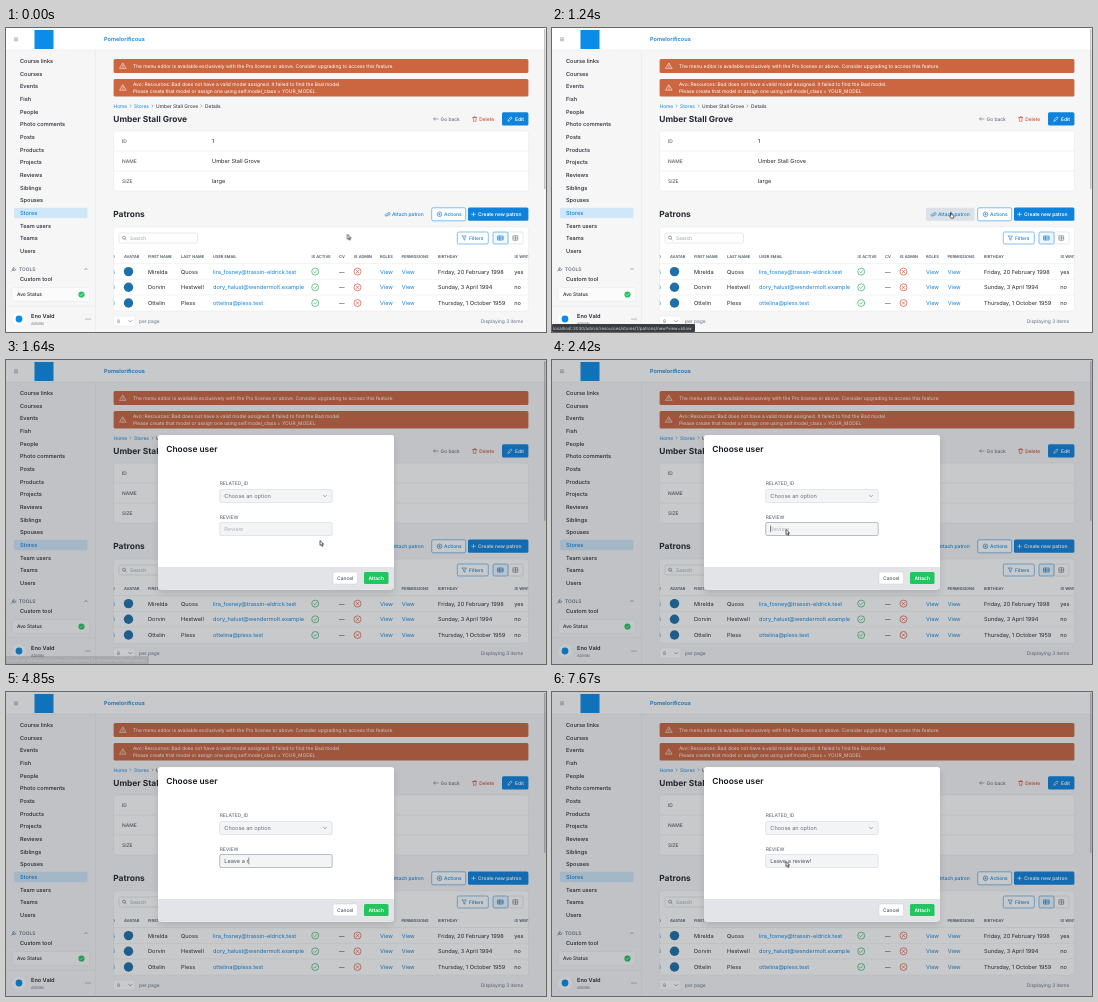
Recreate the animation shown at these times as an HTML page. Size 540 by 304 pixels, loop 8000 ms.

```html
<!DOCTYPE html>
<html lang="en">
<head>
<meta charset="utf-8">
<title>Attach patron</title>
<style>
  html, body { margin: 0; width: 100%; height: 100%; overflow: hidden; background: #f6f6f7; }
  svg { display: block; width: 100vw; height: 100vh; }
  text { font-family: Inter, sans-serif; text-rendering: geometricPrecision; white-space: pre; }

  .timed { animation: 8s step-end infinite; }
  #modal { animation-name: modal; }
  #hover { animation-name: hover; }
  #status { animation-name: status; animation-timing-function: linear; }
  #field { animation-name: focus; animation-timing-function: linear; }
  #cursor { animation-name: move; animation-timing-function: ease-in-out; }
  #pointer { animation-name: pointer; }
  #arrow { animation-name: arrow; }
  #hand { animation-name: hand; }

  @keyframes modal { 0% { visibility: hidden; } 15.7%, 100% { visibility: visible; } }
  @keyframes hover { 0%, 15.7%, 100% { opacity: 0; } 14% { opacity: 1; } }
  @keyframes status {
    0%, 13.9% { opacity: 0; }
    14.1%, 18.2% { opacity: 1; }
    21%, 100% { opacity: 0; }
  }
  @keyframes focus {
    0%, 25.7% { stroke: #cdd0d4; }
    26.1%, 93.5% { stroke: #777c84; }
    95.5%, 100% { stroke: #cdd0d4; }
  }
  @keyframes move {
    0%, .3% { transform: translate(341.4px, 206.3px); }
    1.5%, 4.7% { transform: translate(335.5px, 201.5px); }
    14.75%, 16.4% { transform: translate(398px, 184.5px); animation-timing-function: ease-in; }
    20.5% { transform: translate(314.4px, 180.5px); animation-timing-function: ease-out; }
    25%, 90% { transform: translate(234px, 169.5px); }
    91.6% { transform: translate(236px, 171px); }
    95.8%, 100% { transform: translate(234px, 169.5px); }
  }
  @keyframes pointer { 0%, 91.6%, 100% { opacity: 1; } 39% { opacity: 0; } }
  @keyframes arrow { 0%, 16.6%, 100% { opacity: 1; } 14% { opacity: 0; } }
  @keyframes hand { 0%, 16.6%, 100% { opacity: 0; } 14% { opacity: 1; } }
</style>
</head>
<body>
<svg id="stage" viewBox="0 0 540 304" preserveAspectRatio="none"></svg>
<script>
const BLUE = '#0f83dc', INK = '#24282f', GRAY = '#6b7280', LINE = '#e4e6e9';
const SMALL = 4.9, BASE = 5.6, TITLE = 8.4;
const STORE = 'Umber Stall Grove';

// Text is placed by its vertical middle.
const text = (x, mid, str, size = BASE, fill = INK, weight = 400, anchor = 'start') =>
  `<text x="${x}" y="${mid + size * .36}" font-size="${size}" fill="${fill}" font-weight="${weight}" text-anchor="${anchor}">${str}</text>`;
const rect = (x, y, w, h, fill, stroke = 'none', r = 1.5, extra = '') =>
  `<rect x="${x}" y="${y}" width="${w}" height="${h}" rx="${r}" fill="${fill}" stroke="${stroke}" stroke-width=".5" ${extra}/>`;
const disc = (x, y, r, fill, stroke = 'none') =>
  `<circle cx="${x}" cy="${y}" r="${r}" fill="${fill}" stroke="${stroke}" stroke-width=".65"/>`;
const icon = (x, y, d, color, width = .6) =>
  `<path transform="translate(${x} ${y})" d="${d}" fill="none" stroke="${color}" stroke-width="${width}" stroke-linecap="round" stroke-linejoin="round"/>`;
const hline = (x1, x2, y, color = LINE) => icon(x1, y, `M0 0H${x2 - x1}`, color, .5);

// Icon paths, drawn around their centre.
const CHECK = 'M-1.5 .1L-.4 1.2L1.6 -1.1';
const CROSS = 'M-1.3 -1.3L1.3 1.3M1.3 -1.3L-1.3 1.3';
const DOWN = 'M-1.6 -.8L0 .8L1.6 -.8';
const NEXT = 'M-.6 -1.2L.6 0L-.6 1.2';
const WARN = 'M0 -2.7L3.1 2.4H-3.1ZM0 -1V.6M0 1.5V1.6';
const GRID = 'M-2.2 -2.2H2.2V2.2H-2.2ZM0 -2.2V2.2M-2.2 0H2.2';
const CLIP = 'M-.6 1.2L1.3 -.7M-.7 -.2L.8 -1.7A1.2 1.2 0 0 1 2.4 0L.9 1.6M.4 .5L-.9 1.9A1.2 1.2 0 0 1 -2.3 .3L-1.3 -.7';
const WRENCH = 'M-2.2 2.2L.5 -.5M.2 -1.6A1.6 1.6 0 1 0 2.1 .2';

function sidebar() {
  const items = ['Course links', 'Courses', 'Events', 'Fish', 'People', 'Photo comments', 'Posts', 'Products',
    'Projects', 'Reviews', 'Siblings', 'Spouses', 'Stores', 'Team users', 'Teams', 'Users'];
  return rect(8, 179.8, 73.5, 10.4, '#cfe7f8') +
    items.map((name, i) => text(14, 33 + i * 12.66, name, BASE, name === 'Stores' ? BLUE : INK, 500)).join('') +
    icon(7.8, 241, WRENCH, GRAY, .8) +
    text(13, 241, 'TOOLS', SMALL, GRAY, 600) + icon(80, 241, 'M-1.3 .7L0 -.7L1.3 .7', GRAY) +
    text(14, 251, 'Custom tool', BASE, INK, 500) +
    rect(0, 254.5, 88, 49.5, '#f6f6f7', 'none', 0) +
    rect(6, 259.5, 77.5, 14, '#fbfbfb', LINE) + text(11, 266.5, 'Avo Status', SMALL, INK, 500) +
    disc(75.5, 266.5, 3.1, '#22c55e') + icon(75.5, 266.5, CHECK, '#fff', .5) +
    hline(0, 89, 278) + disc(13, 291, 6.6, '#fff') + disc(13, 291, 3.4, '#0b8ce9') +
    text(25, 288.4, 'Eno Vald', BASE, INK, 600) + text(25, 296, 'ADMIN', 3.8, GRAY) +
    [-2, 0, 2].map(dx => disc(82 + dx, 291, .55, GRAY)).join('') +
    rect(89, 22, .5, 282, LINE, 'none', 0);
}

function header() {
  return rect(0, 0, 540, 22, '#fff', 'none', 0) + hline(0, 540, 22) +
    icon(10, 11.3, 'M-1.7 -1.4H1.7M-1.7 0H1.7M-1.7 1.4H1.7', GRAY, .5) +
    rect(28.5, 2, 19, 19, '#0b8ce9', 'none', 0) + text(98, 11.3, 'Pomelorificous', BASE, BLUE, 600) +
    rect(538.2, 1, 1.2, 160, '#b4b6b9', 'none', .6);
}

function details() {
  const banner = (y, h) => rect(107.6, y, 414.8, h, '#cb6640') + icon(117, y + h / 2, WARN, '#fff', .55);
  const row = (label, value, y) => text(116, y, label, SMALL, '#565c66', 500) + text(206, y, value);
  return banner(31, 14) + banner(51, 17.5) +
    text(127, 38, 'The menu editor is available exclusively with the Pro license or above. Consider upgrading to access this feature.', SMALL, '#fff') +
    text(127, 56.7, 'Avo::Resources::Bad does not have a valid model assigned. It failed to find the Bad model.', SMALL, '#fff') +
    text(127, 63, 'Please create that model or assign one using self.model_class = YOUR_MODEL', SMALL, '#fff') +
    text(107.5, 78, 'Home', SMALL, BLUE) + text(128, 78, 'Stores', SMALL, BLUE) +
    text(150, 78, STORE, SMALL) + text(199, 78, 'Details', SMALL) +
    [124.7, 146.7, 195.6].map(x => icon(x, 78, NEXT, GRAY, .5)).join('') +
    text(107.3, 91, STORE, TITLE, INK, 700) +
    icon(429.8, 91, 'M2.2 0H-2.2M-.7 -1.5L-2.2 0L-.7 1.5', GRAY) + text(434.5, 91, 'Go back', SMALL, GRAY, 500) +
    icon(468.7, 91, 'M-2 -1.5H2M-1.5 -1.5L-1.2 2.3H1.2L1.5 -1.5M-.7 -1.5V-2.3H.7V-1.5', '#c8502e') +
    text(473.2, 91, 'Delete', SMALL, '#c8502e', 500) +
    rect(496, 84.3, 26.4, 13.2, BLUE) + icon(504, 91, 'M-2 2L-1.6 .5L1 -2.1L2.1 -1L-.5 1.6Z', '#fff') +
    text(509, 91, 'Edit', SMALL, '#fff', 600) +
    rect(107.6, 103, 414.8, 60, '#fff', LINE) + hline(107.6, 522.4, 123) + hline(107.6, 522.4, 143) +
    row('ID', '1', 113) + row('NAME', STORE, 133) + row('SIZE', 'large', 153);
}

function toolbar() {
  return text(107.3, 186, 'Patrons', TITLE, INK, 700) +
    `<g id="hover" class="timed">${rect(374, 179.8, 48.5, 13, '#dbe1e7')}</g>` +
    icon(381.5, 186.3, CLIP, BLUE) + text(386, 186.3, 'Attach patron', SMALL, BLUE, 500) +
    rect(425.7, 179.8, 34, 13, '#fff', BLUE) + disc(433.5, 186.3, 2.3, 'none', BLUE) +
    icon(433.5, 186.3, 'M-.8 0H.8M0 -.8V.8', BLUE) + text(438, 186.3, 'Actions', SMALL, BLUE, 500) +
    rect(462, 179.6, 60.4, 13.2, BLUE) + icon(467.5, 186.3, 'M-1.8 0H1.8M0 -1.8V1.8', '#fff') +
    text(472, 186.3, 'Create new patron', SMALL, '#fff', 600);
}

function table() {
  const heads = [[106, 'D'], [118, 'AVATAR'], [142, 'FIRST NAME'], [175, 'LAST NAME'], [207, 'USER EMAIL'], [305.5, 'IS ACTIVE'],
    [333, 'CV'], [348, 'IS ADMIN'], [374, 'ROLES'], [395.5, 'PERMISSIONS'], [432, 'BIRTHDAY'], [508.5, 'IS WRITER']];
  const people = [
    ['Mirelda', 'Quoss', 'lira_fosney@trassin-eldrick.test', 'Friday, 20 February 1998', 'yes'],
    ['Dorvin', 'Hestwell', 'dory_halust@wendermolt.example', 'Sunday, 3 April 1994', 'no'],
    ['Ottelin', 'Pless', 'ottelina@pless.test', 'Thursday, 1 October 1959', 'no']];
  const row = ([first, last, email, birthday, writer], i) => {
    const y = 243.6 + i * 15.7;
    return hline(107, 522, y - 8) + text(105.8, y, '5', BASE, BLUE) + disc(122.5, y, 4.7, '#1f6fa9') +
      text(142, y, first) + text(175, y, last) + text(207, y, email, BASE, BLUE) +
      disc(309.2, y, 3.5, 'none', '#22a95a') + icon(309.2, y, CHECK, '#22a95a') + text(333, y, '—') +
      disc(351.5, y, 3.5, 'none', '#d2492f') + icon(351.5, y, CROSS, '#d2492f') +
      text(374, y, 'View', BASE, BLUE) + text(395.7, y, 'View', BASE, BLUE) +
      text(432, y, birthday) + text(508.2, y, writer);
  };
  return rect(107.6, 199, 414.8, 84, '#fff', LINE) +
    rect(113, 205, 78.5, 10, '#fff', '#cfd2d6') + disc(118, 209.6, 1.5, 'none', GRAY) +
    icon(119.1, 210.7, 'M0 0L1.1 1.1', GRAY) + text(124, 210, 'Search', SMALL, '#9aa0a9') +
    rect(451.3, 204, 31, 12, '#fff', BLUE) + icon(458.3, 210, 'M-2 -2H2L.6 0V2.2L-.6 1.4V0Z', BLUE) +
    text(463, 210, 'Filters', SMALL, BLUE, 500) +
    rect(502, 204, 15, 12, '#fff', '#c9cdd2') + rect(487, 204, 15, 12, '#eff6fc', BLUE) +
    icon(494.5, 210, 'M-2.6 -2H2.6V2H-2.6ZM-2.6 -.7H2.6M-2.6 .7H2.6M-.9 -2V2', BLUE) + icon(509.5, 210, GRID, GRAY) +
    `<g clip-path="url(#tableClip)">` +
    heads.map(([x, name]) => text(x, 228.5, name, 3.95, '#4b5563', 600)).join('') + people.map(row).join('') + '</g>' +
    rect(107.5, 288, 21.5, 10, '#fff', LINE) + text(111, 293.2, '8', SMALL, GRAY) + icon(124.3, 293.2, DOWN, GRAY) +
    text(133, 293.2, 'per page', SMALL, GRAY) + text(517, 293.2, 'Displaying 3 items', SMALL, GRAY, 400, 'end');
}

function modal() {
  return `<g id="modal" class="timed">` +
    rect(0, 0, 540, 304, 'rgba(34,40,50,.25)', 'none', 0) +
    `<g style="filter:drop-shadow(0 3px 3px rgba(0,0,0,.12))">${rect(152, 75, 236, 155, '#e2e4e7', 'none', 3)}</g>` +
    '<path d="M152 207V78a3 3 0 0 1 3-3H385a3 3 0 0 1 3 3V207Z" fill="#fff"/>' +
    text(160.3, 88.7, 'Choose user', TITLE, '#14171c', 600) +
    text(213.7, 123.3, 'RELATED_ID', SMALL, GRAY, 500) +
    rect(213.7, 129.5, 112.5, 13, '#f3f4f5', '#cdd0d4') +
    text(218.3, 136, 'Choose an option', BASE, GRAY) + icon(319, 136, DOWN, GRAY) +
    text(213.7, 157.3, 'REVIEW', SMALL, GRAY, 500) +
    rect(213.7, 162.5, 112.5, 13, '#f3f4f5', '#cdd0d4', 1.5, 'id="field" class="timed"') +
    `<g id="placeholder">${text(218.3, 169, 'Review', BASE, '#adb2ba')}</g>` +
    `<g id="typed">${text(218.3, 169, '', BASE, '#4b5563')}</g>` +
    '<rect id="caret" y="165.5" width=".5" height="6.8" fill="#24282f"/>' +
    rect(327, 212, 24.5, 12, '#fff', '#c9cdd2') + text(339.2, 218, 'Cancel', SMALL, '#4b5563', 500, 'middle') +
    rect(358, 212, 24.5, 12, '#22c55e') + text(370.2, 218, 'Attach', SMALL, '#fff', 600, 'middle') + '</g>';
}

function overlays() {
  return `<g id="status" class="timed">${rect(0, 296, 143, 8, '#3a3d41', 'none', 1)}` +
    text(1, 300, 'localhost:3030/admin/resources/stores/1/patrons/new?view=show', 4.4, '#d5d8dc') + '</g>' +
    '<g id="cursor" class="timed"><g id="pointer" class="timed" fill="#fff" stroke="#1c1c1c" stroke-width=".7">' +
    '<path id="arrow" class="timed" d="M0 0V5L1.2 4L2 5.8L2.9 5.4L2.1 3.7H3.7Z"/>' +
    '<path id="hand" class="timed" d="M.5 0Q1.2 -.3 1.3 .5V2L3.3 2.4Q4 2.6 3.9 3.3L3.4 5.6H1L-.6 3.6Q-.6 2.8 .5 3.4Z"/></g></g>';
}

document.getElementById('stage').innerHTML =
  '<defs><clipPath id="tableClip"><rect x="107.6" y="199" width="414.6" height="84"/></clipPath></defs>' +
  rect(0, 0, 540, 304, '#f6f6f7', 'none', 0) + sidebar() + header() + details() + toolbar() + table() + modal() + overlays();

const REVIEW = 'Leave a review!';
const KEY_TIMES = [3330, 3420, 3610, 3790, 4030, 4180, 4360, 4520, 4760, 4850, 5210, 5360, 5700, 5910, 6180];
const HALF_FRAME = 15;
const typed = document.querySelector('#typed text');
const placeholder = document.getElementById('placeholder');
const caret = document.getElementById('caret');
const clock = document.getElementById('modal').getAnimations()[0];

function draw() {
  const t = (clock.currentTime || 0) % 8000 + HALF_FRAME;
  const count = KEY_TIMES.filter(time => time <= t).length;
  typed.textContent = REVIEW.slice(0, count);
  placeholder.style.display = count ? 'none' : '';
  caret.setAttribute('x', 218.4 + (count ? typed.getComputedTextLength() : 0));
  const caretOn = (t >= 2090 && t < 2600) || (t >= 3120 && t < 6910);
  caret.style.display = caretOn ? '' : 'none';
  requestAnimationFrame(draw);
}
draw();
</script>
</body>
</html>
```
